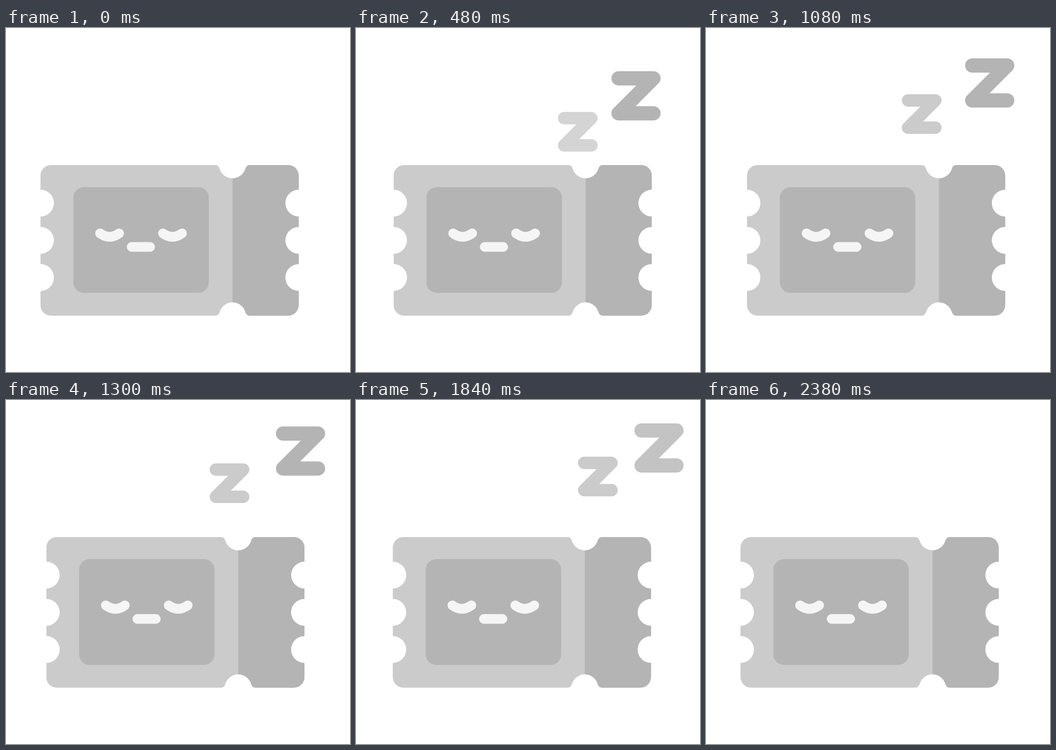
Animation of 748x748 px, one loop 2.4 s. Source, as an HTML page:

```html
<!DOCTYPE html>
<html lang="en">
<head>
<meta charset="utf-8">
<title>Sleeping ticket</title>
<style>
  html, body { margin: 0; width: 100%; height: 100%; overflow: hidden; background: #fff; }
  svg { display: block; width: 100vw; height: 100vh; }
  .line { fill: none; stroke-linecap: round; stroke-linejoin: round; }
</style>
</head>
<body>
<svg viewBox="0 0 748 748">
  <clipPath id="outline">
    <path d="M98 298H455C459.500 298 463 301 464.500 306A29.200 29.200 0 0 0 520.500 306C522 301 525.500 298 530 298
      H613.500A23 23 0 0 1 636.500 321
      V351.500a29.200 29.200 0 0 0 0 58.400V432.500a29.200 29.200 0 0 0 0 58.400V513.300a29.200 29.200 0 0 0 0 58.400
      V602.500A23 23 0 0 1 613.500 625.500H530C525.500 625.500 522 622.500 520.500 617.500
      A29.200 29.200 0 0 0 464.500 617.500C463 622.500 459.500 625.500 455 625.500H98A23 23 0 0 1 75 602.500
      V571.700a29.200 29.200 0 0 0 0 -58.400V490.900a29.200 29.200 0 0 0 0 -58.400V409.900a29.200 29.200 0 0 0 0 -58.400
      V321A23 23 0 0 1 98 298Z"/>
  </clipPath>
  <g id="ticket">
    <g clip-path="url(#outline)">
      <rect x="75" y="298" width="562" height="328" fill="#cbcbcb"/>
      <rect x="492.500" y="298" width="145" height="328" fill="#b4b4b4"/>
    </g>
    <rect x="146.500" y="346" width="294.500" height="230" rx="23" fill="#b4b4b4"/>
    <path class="line" stroke="#f5f5f5" stroke-width="20.800"
      d="M204.400 446.500Q225.200 461.800 246 446.500M341.200 446.500Q362 461.800 382.800 446.500M273 476H313.500"/>
  </g>
  <path id="smallZ" class="line" stroke="#cbcbcb" stroke-width="27" d="M13.500 13.500H72.800L13.500 72.800H72.800"/>
  <path id="bigZ" class="line" stroke="#b4b4b4" stroke-width="31" d="M15.500 15.500H91.500L15.500 91.500H91.500"/>
</svg>
<script>
const LOOP = 2400;
const ticket = document.getElementById('ticket');
const letters = [
  { el: document.getElementById('bigZ'), x: 562.4, y: 112, delay: 200 },
  { el: document.getElementById('smallZ'), x: 439.8, y: 184.5, delay: 400 }
];

const ramp = (t, from, to) => Math.min(1, Math.max(0, (t - from) / (to - from)));
const ease = (t, from, to) => {
  const u = ramp(t, from, to);
  return u * u * (3 - 2 * u);
};

// Each letter drifts up to the left, then up to the right, and fades away.
function drawLetter({ el, x, y, delay }, time) {
  const t = time - delay;
  const first = ease(t, 0, 600), second = ease(t, 600, 1400);
  const dx = -15.6 * first + 58.6 * second;
  const dy = -40 * first - 21.3 * second;
  el.setAttribute('transform', `translate(${x + dx} ${y + dy})`);
  el.setAttribute('opacity', ramp(t, 0, 100) * (1 - ramp(t, 1600, 1800)));
}

function draw(now) {
  const t = now % LOOP;
  const sway = 14.2 * (ease(t, 0, 1000) - ease(t, 1000, LOOP));
  ticket.setAttribute('transform', `translate(${sway} 0)`);
  letters.forEach(letter => drawLetter(letter, t));
}

const start = performance.now();
function tick() {
  draw(performance.now() - start);
  requestAnimationFrame(tick);
}
tick();
</script>
</body>
</html>
```
